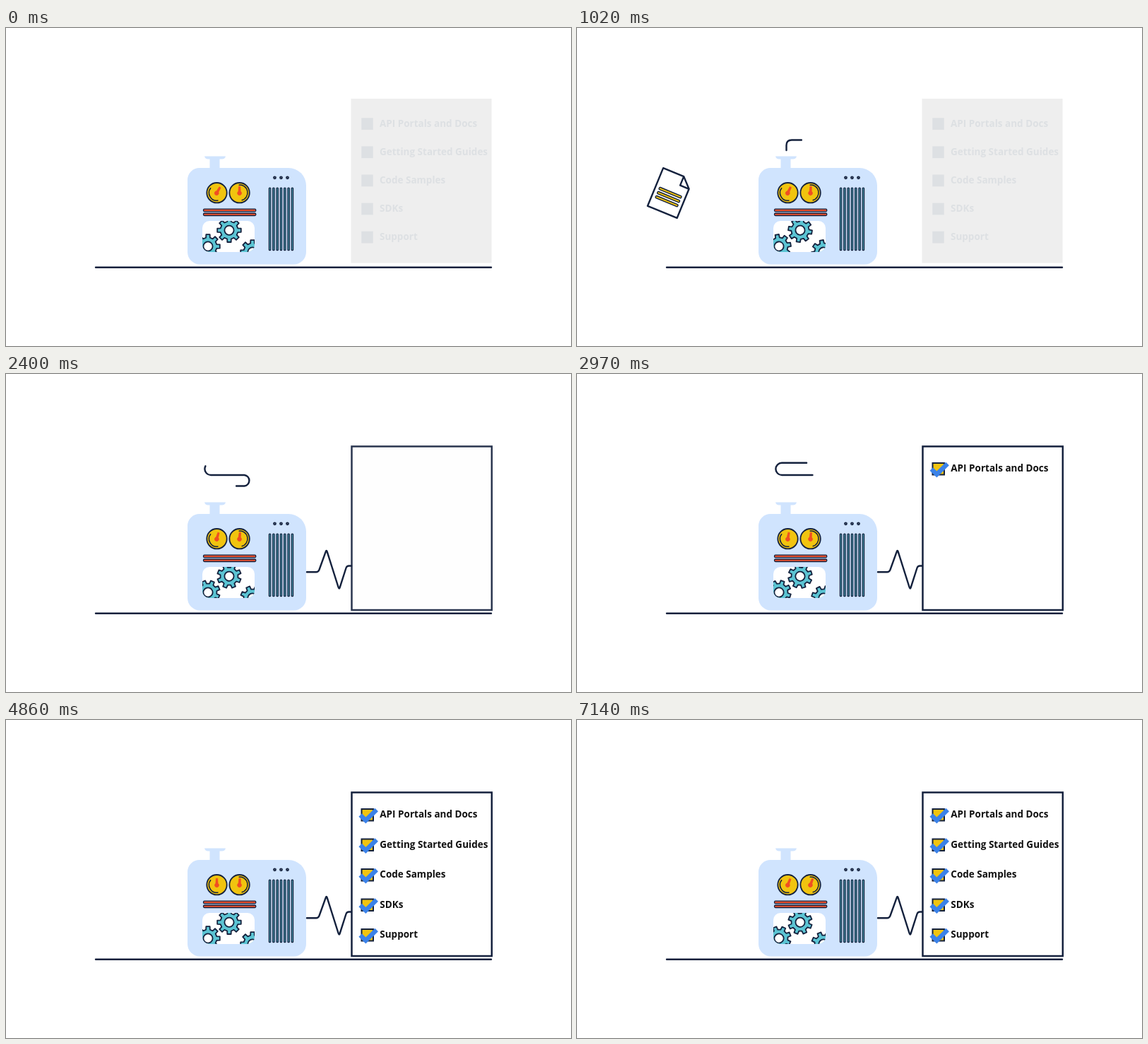
An HTML page for the animation above (7170 ms loop, 800 by 450 pixels).

```html
<!DOCTYPE html>
<html lang="en">
<head>
<meta charset="utf-8">
<title>Document machine</title>
<style>
html, body { margin: 0; width: 100%; height: 100%; overflow: hidden; background: #fff }
svg { display: block; width: 800px; height: 450px }
text { font: 700 13.5px "Open Sans", sans-serif }
.line { fill: none; stroke: #14213d; stroke-width: 2.4; stroke-linecap: round; stroke-linejoin: round }
</style>
</head>
<body>
<svg viewBox="0 0 800 450">
  <defs>
    <clipPath id="window"><rect x="278" y="273" width="74" height="44" rx="10"/></clipPath>
  </defs>
  <path class="line" d="M127 338.8H687"/>

  <g id="doc">
    <path class="line" fill="#fff" style="fill:#fff" d="M-22.5-29H9L22.5-15.5V29h-45zM9-29v13.5H22.5"/>
    <g id="docLines"></g>
  </g>

  <path id="smoke" class="line" d="M296.5 173V166q0-7.5 7.5-7.5H337.5a7.8 7.8 0 0 0 0-15.5H290a8.6 8.6 0 0 1 0-17.2H329q8 0 8-9"/>

  <g fill="#d0e4fe">
    <path d="M281 181.5H311Q310 185.5 306 185.5H302.500V199H288.500V185.500H286Q282 185.500 281 181.500z"/>
    <path d="M274 198H400a25 25 0 0 1 25 25V317a17.500 17.500 0 0 1-17.500 17.500H274.500a17.500 17.500 0 0 1-17.500-17.500V215a17 17 0 0 1 17-17z"/>
  </g>
  <g id="gauges" stroke="#14213d"></g>
  <g id="bars" fill="#e8502f" stroke="#14213d" stroke-width="1.300"></g>
  <g id="slats" fill="#4597ab" stroke="#14213d" stroke-width="1.200"></g>
  <g id="dots" fill="#14213d"></g>
  <g clip-path="url(#window)">
    <rect x="278" y="273" width="74" height="44" fill="#fff"/>
    <g id="gears" fill="#5bc4d3" stroke="#14213d" stroke-width="1.800" stroke-linejoin="round"></g>
  </g>

  <path id="pulse" class="line" d="M426 280.300H439Q442.500 280.300 443.500 277L452.700 251.500Q453.700 248.500 454.700 251.500L470.700 302Q471.700 305 472.700 302L481.500 274.500Q482.500 271.500 485.500 271.500H489"/>

  <g id="idle" fill="#dde0e3"><rect x="488.500" y="100" width="199" height="232.500" fill="#eee"/></g>
  <g id="active"><rect x="489.500" y="102.500" width="198.300" height="231.500" fill="#fff" stroke="#14213d" stroke-width="2.500"/></g>
</svg>
<script>
const LOOP = 7170;
const $ = id => document.getElementById(id);

function add(parent, tag, attrs, text) {
  const el = document.createElementNS('http://www.w3.org/2000/svg', tag);
  for (const k in attrs) el.setAttribute(k, attrs[k]);
  if (text) el.textContent = text;
  return parent.appendChild(el);
}

const clamp = (t, a, b) => Math.min(1, Math.max(0, (t - a) / (b - a)));
const easeOut = u => 1 - (1 - u) ** 3;

// Linear interpolation through [time, value] pairs
function track(keys, t) {
  let i = 1;
  while (i < keys.length - 1 && t > keys[i][0]) i++;
  const [t0, v0] = keys[i - 1], [t1, v1] = keys[i];
  return v0 + (v1 - v0) * clamp(t, t0, t1);
}

function showStroke(el, tail, head) {
  el.style.display = head > tail ? '' : 'none';
  el.style.strokeDasharray = `${head - tail} 999`;
  el.style.strokeDashoffset = -tail;
}

function gearPath(teeth, outer, inner) {
  const step = 2 * Math.PI / teeth, points = [];
  for (let i = 0; i < teeth; i++)
    for (const [f, r] of [[-.29, inner], [-.2, outer], [.2, outer], [.29, inner]]) {
      const a = (i + f) * step;
      points.push((r * Math.cos(a)).toFixed(2) + ' ' + (r * Math.sin(a)).toFixed(2));
    }
  return 'M' + points.join('L') + 'z';
}

for (const y of [-0.5, 6, 12.5])
  add($('docLines'), 'rect', {x: -17, y: y - 1.7, width: 34, height: 3.4, rx: 1.2, fill: '#f1c40f', stroke: '#14213d', 'stroke-width': 1.4});
for (const y of [256.2, 262])
  add($('bars'), 'rect', {x: 279.5, y, width: 74.3, height: 3.5, rx: 1.5});
for (let i = 0; i < 7; i++)
  add($('slats'), 'rect', {x: 372.4 + 5.3 * i, y: 226, width: 2.4, height: 88.7, rx: 1});
for (const x of [380.5, 389.5, 398.5]) {
  add($('dots'), 'circle', {cx: x, cy: 211.8, r: 2.4});
  add($('dots'), 'path', {d: `M${x - 1} 212.8l2-2`, stroke: '#8fa3bd', 'stroke-width': .7});
}

const needles = [
  [298.5, 'M2 10.8A11 11 0 0 1-8.5-7'],
  [330.6, 'M-1-11A11 11 0 0 1 3 10.600']
].map(([x, arc]) => {
  const g = add($('gauges'), 'g', {transform: `translate(${x} 233.200)`});
  add(g, 'circle', {r: 14.2, fill: '#f1c40f', 'stroke-width': 1.8});
  add(g, 'path', {d: arc, fill: 'none', 'stroke-width': 1.5});
  return add(g, 'path', {d: 'M-1.2-9H1.2L1.600-2A3 3 0 1 1-1.600-2z', fill: '#f04e23', stroke: '#f04e23', 'stroke-width': .6});
});

const gears = [[316, 286.2, 1], [286, 309, -1], [349, 317, -1]].map(([x, y, dir]) => {
  const el = add($('gears'), 'g', {});
  add(el, 'path', {d: gearPath(8, 17, 12.6)});
  add(el, 'circle', {r: 6.6, fill: '#fff'});
  return {el, x, y, dir};
});

const labels = ['API Portals and Docs', 'Getting Started Guides', 'Code Samples', 'SDKs', 'Support'];
const items = labels.map((label, i) => {
  const idleY = 127.3 + 40.1 * i;
  add($('idle'), 'rect', {x: 503.3, y: idleY, width: 16.4, height: 16.8});
  add($('idle'), 'text', {x: 529, y: idleY + 12.7}, label);
  const row = add($('active'), 'g', {transform: `translate(0 ${42.5 * i})`});
  add(row, 'rect', {x: 503.5, y: 126, width: 16.5, height: 16.5, fill: '#f1c40f', stroke: '#14213d', 'stroke-width': 2});
  add(row, 'text', {x: 529.3, y: 138, fill: '#111'}, label);
  const tick = add(row, 'path', {d: 'M-11.500-.500L-3.800 7L11.500-8', fill: 'none', stroke: '#3b82e8', 'stroke-width': 6.5});
  return {row, tick, start: 2620 + 450 * i};
});

const DOC_X = [[0, 36], [720, 92], [1020, 131.5], [1500, 300]];
const DOC_Y = [[0, 311], [720, 295], [1020, 233.5], [1500, 255]];
const DOC_TURN = [[0, 0], [720, 10], [1020, 22.3], [1500, 60]];
const NEEDLES = [
  [[0, 30], [1740, 23], [2970, 10], [4860, 0], [5880, 2], [7140, 22]],
  [[0, 0], [1740, 5], [2970, 5], [4860, 3], [5880, 12], [7140, 20]]
];
const smokeLength = $('smoke').getTotalLength();
const pulseLength = $('pulse').getTotalLength();

function draw(t) {
  $('doc').style.display = t >= 30 && t < 1500 ? '' : 'none';
  $('doc').style.opacity = clamp(t, 0, 250);
  $('doc').setAttribute('transform', `translate(${track(DOC_X, t)} ${track(DOC_Y, t)}) rotate(${track(DOC_TURN, t)})`);

  needles.forEach((n, i) => n.setAttribute('transform', `rotate(${track(NEEDLES[i], t)})`));
  for (const {el, x, y, dir} of gears)
    el.setAttribute('transform', `translate(${x} ${y}) rotate(${dir * 45 * t / 4860})`);

  const head = Math.min(smokeLength, Math.max(0, (t - 600) * .0777));
  showStroke($('smoke'), smokeLength * clamp(t, 1700, 4700) ** 1.1, head);

  showStroke($('pulse'), 0, pulseLength * clamp(t, 1470, 1970));
  $('pulse').style.stroke = t < 2250 ? '#5bc4d3' : '#14213d';

  const swap = clamp(t, 2220, 2420);
  $('idle').style.opacity = 1 - swap;
  $('active').style.opacity = swap;
  for (const {row, tick, start} of items) {
    row.style.opacity = clamp(t, start, start + 150);
    const size = easeOut(clamp(t, start + 150, start + 400));
    tick.setAttribute('transform', `translate(513.200 135) scale(${size})`);
  }
}

function frame(now) {
  draw(now % LOOP);
  requestAnimationFrame(frame);
}
draw(0);
requestAnimationFrame(frame);
</script>
</body>
</html>
```
